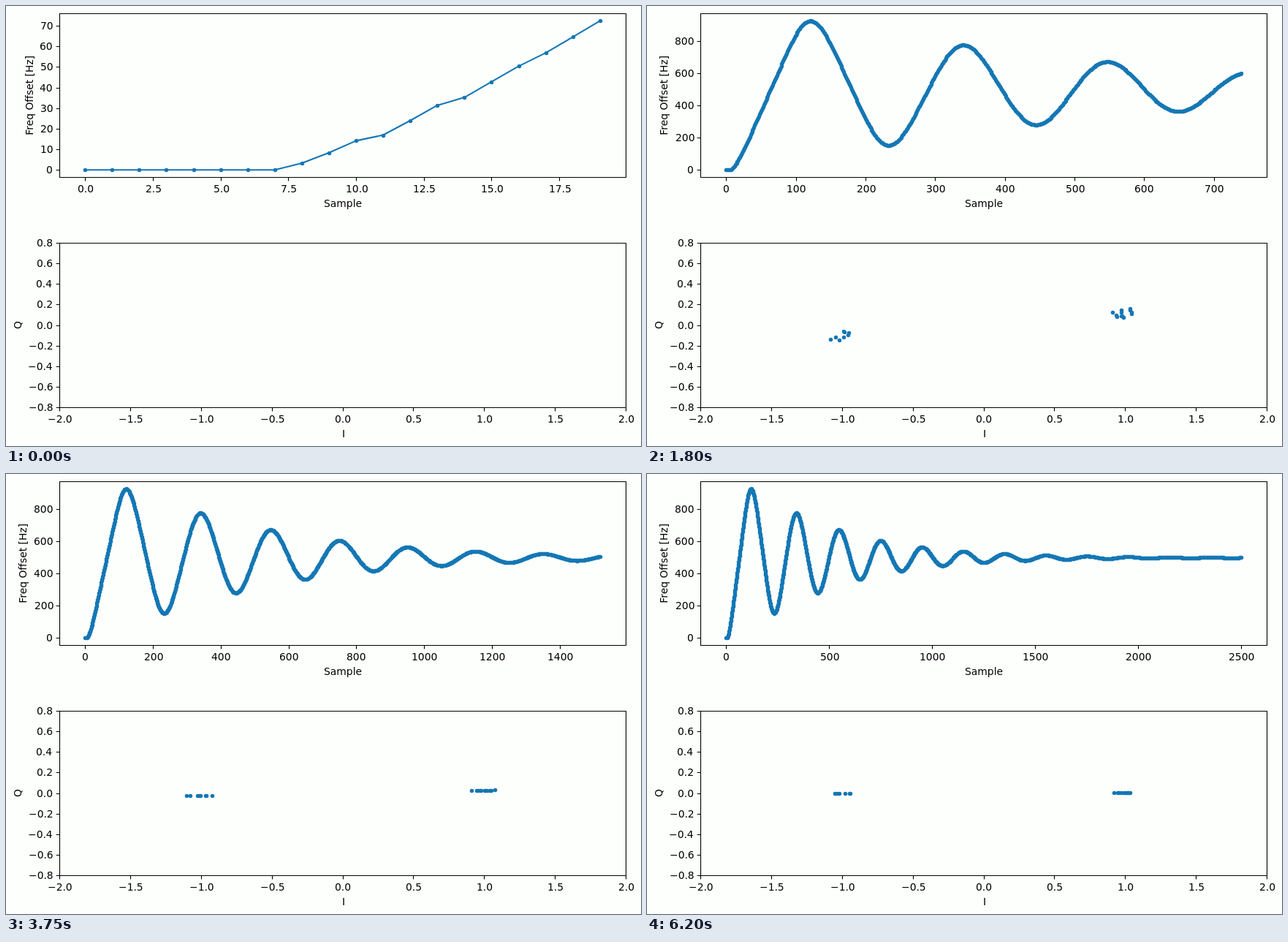
Write an HTML page that moves like this. It is 869 by 602 pixels and loops after 6250 ms.

```html
<!DOCTYPE html>
<html lang="en">
<head>
<meta charset="utf-8">
<title>Costas loop convergence</title>
<style>
  html, body { margin: 0; width: 100%; height: 100%; overflow: hidden; background: #fdfffd; }
  svg { display: block; width: 869px; height: 602px; }
  text { font: 13.89px "DejaVu Sans", sans-serif; fill: #000; }
  .axes { fill: none; stroke: #000; stroke-width: 1.11; }
  .line { fill: none; stroke: #1477b4; stroke-width: 2.08; stroke-linejoin: round; }
  .dots { fill: none; stroke: #1477b4; stroke-width: 5.56; stroke-linecap: round; }
</style>
</head>
<body>
<svg viewBox="0 0 869 602">
  <clipPath id="lower"><rect x="73" y="324.4" width="775" height="224.2"/></clipPath>
  <path class="line" id="curve"/>
  <path class="dots" id="samples"/>
  <path class="dots" id="symbols" clip-path="url(#lower)"/>
  <g id="upperAxes"></g>
  <g id="lowerAxes"></g>
</svg>
<script>
const STEP_MS = 50, STEPS = 125, PER_STEP = 20;
const LEFT = 73, RIGHT = 848;
const UPPER = { top: 10.2, bottom: 234.4, ticksY: 255, titleY: 275 };
const LOWER = { top: 324.4, bottom: 548.6, ticksY: 570, titleY: 590 };
const $ = id => document.getElementById(id);

// --- Costas loop: frequency estimate and remaining phase error per sample ---
const HZ = 125000 / (2 * Math.PI), ALPHA = 0.005, BETA = 0.001, POWER = 0.99, OFFSET = 500;
const DELAY = 8, START_PHASE = 0.21;
const freq = new Array(DELAY).fill(0), phase = new Array(DELAY).fill(0);

// Symbol power ripples while the timing settles.
const power = n => POWER * (1 - 0.5 * Math.cos(2 * Math.PI * (n - 11) / 3) * Math.exp(-(((n - 12) / 4) ** 2)));

for (let n = DELAY, phi = START_PHASE; n < STEPS * PER_STEP; n++) {
  const err = power(n) * Math.sin(2 * phi) / 2;
  const f = freq[n - 1] + BETA * err * HZ;
  freq.push(f);
  phase.push(phi);
  phi += (OFFSET - f) / HZ - ALPHA * err;
}

function random(seed) {
  return () => {
    seed = (seed + 0x6D2B79F5) | 0;
    let t = Math.imul(seed ^ (seed >>> 15), 1 | seed);
    t ^= t + Math.imul(t ^ (t >>> 7), 61 | t);
    return ((t ^ (t >>> 14)) >>> 0) / 4294967296;
  };
}

// Random bits as +1 / -1 with a little amplitude noise.
const rnd = random(5);
const symbols = freq.map(() => {
  const size = 1 + (rnd() + rnd() + rnd() - 1.5) * 0.09;
  return rnd() < 0.5 ? -size : size;
});

// --- drawing helpers: strokes and dots sit on pixel centres ---
const pen = document.createElement("canvas").getContext("2d");
pen.font = '13.89px "DejaVu Sans", sans-serif';
const crisp = v => Math.round(v) + 0.5;
const dot = (x, y) => `M${crisp(x)} ${crisp(y)}h0`;
const number = (v, digits) => v.toFixed(digits).replace("-", "\u2212");

// Aligns the inked width: 0.5 centres on x, 1 ends at x.
function label(x, y, s, align) {
  const m = pen.measureText(s);
  const ink = m.actualBoundingBoxLeft + m.actualBoundingBoxRight;
  return `<text x="${Math.round(x - ink * align)}" y="${y}">${s}</text>`;
}

function niceStep(range, bins) {
  const raw = range / bins, base = 10 ** Math.floor(Math.log10(raw));
  return base * [1, 2, 2.5, 5, 10].find(m => m * base >= raw - 1e-9);
}

function ticks(from, to, step) {
  const list = [];
  for (let i = 0; from + i * step <= to + 1e-9; i++) list.push(from + i * step);
  return list;
}

function axes(box, xs, ys, toX, toY, digits, titles, titleX) {
  const l = crisp(LEFT), r = crisp(RIGHT), t = crisp(box.top), b = crisp(box.bottom);
  let path = `M${l} ${t}H${r}V${b}H${l}Z`, text = "";
  for (const v of xs) {
    const x = toX(v);
    path += `M${crisp(x)} ${b}v4.9`;
    text += label(x, box.ticksY, number(v, digits[0]), 0.5);
  }
  for (const v of ys) {
    const y = toY(v);
    path += `M${l} ${crisp(y)}h-4.9`;
    text += label(63.3, Math.round(y + 5), number(v, digits[1]), 1);
  }
  const midY = (box.top + box.bottom) / 2;
  text += label((LEFT + RIGHT) / 2, box.titleY, titles[0], 0.5);
  text += `<text transform="translate(${titleX} ${midY}) rotate(-90)" text-anchor="middle">${titles[1]}</text>`;
  return `<path class="axes" d="${path}"/>${text}`;
}

// --- lower plot: fixed scale ---
const toI = v => LEFT + (v + 2) / 4 * (RIGHT - LEFT);
const toQ = v => LOWER.bottom - (v + 0.8) / 1.6 * (LOWER.bottom - LOWER.top);
$("lowerAxes").innerHTML =
  axes(LOWER, ticks(-2, 2, 0.5), ticks(-0.8, 0.8, 0.2).map(v => Math.round(v * 10) / 10 + 0),
    toI, toQ, [1, 1], ["I", "Q"], 21);

function drawSymbols(step) {
  const first = step * PER_STEP;
  const d = step === 0 ? "" : symbols.slice(first, first + PER_STEP).map((a, i) => {
    const p = phase[first + i];
    return dot(toI(a * Math.cos(p)), toQ(a * Math.sin(p)));
  }).join("");
  $("symbols").setAttribute("d", d);
}

// --- upper plot: scale follows the data, with 5% margins ---
function drawCurve(step) {
  const count = (step + 1) * PER_STEP, last = count - 1;
  const data = freq.slice(0, count), peak = Math.max(...data);
  const width = (RIGHT - LEFT) / 1.1, height = (UPPER.bottom - UPPER.top) / 1.1;
  const toX = v => LEFT + width * (0.05 + v / last);
  const toY = v => UPPER.bottom - height * (0.05 + v / peak);
  const pts = data.map((f, i) => [toX(i), toY(f)]);
  $("curve").setAttribute("d", "M" + pts.map(p => p.map(v => v.toFixed(2)).join(" ")).join("L"));
  $("samples").setAttribute("d", pts.map(p => dot(...p)).join(""));

  const stepX = niceStep(last * 1.1, 9), stepY = niceStep(peak * 1.1, 8);
  const xs = ticks(0, last * 1.05, stepX), ys = ticks(0, peak * 1.05, stepY);
  const wide = String(ys[ys.length - 1]).length;
  $("upperAxes").innerHTML = axes(UPPER, xs, ys, toX, toY, [stepX % 1 ? 1 : 0, 0],
    ["Sample", "Freq Offset [Hz]"], 36.5 - 8.84 * (wide - 2));
}

// --- playback ---
let shown = -1;
const start = performance.now();
function play(now) {
  const step = Math.floor(Math.max(0, now - start) / STEP_MS) % STEPS;
  if (step !== shown) {
    shown = step;
    drawCurve(step);
    drawSymbols(step);
  }
  requestAnimationFrame(play);
}
play(start);
</script>
</body>
</html>
```
